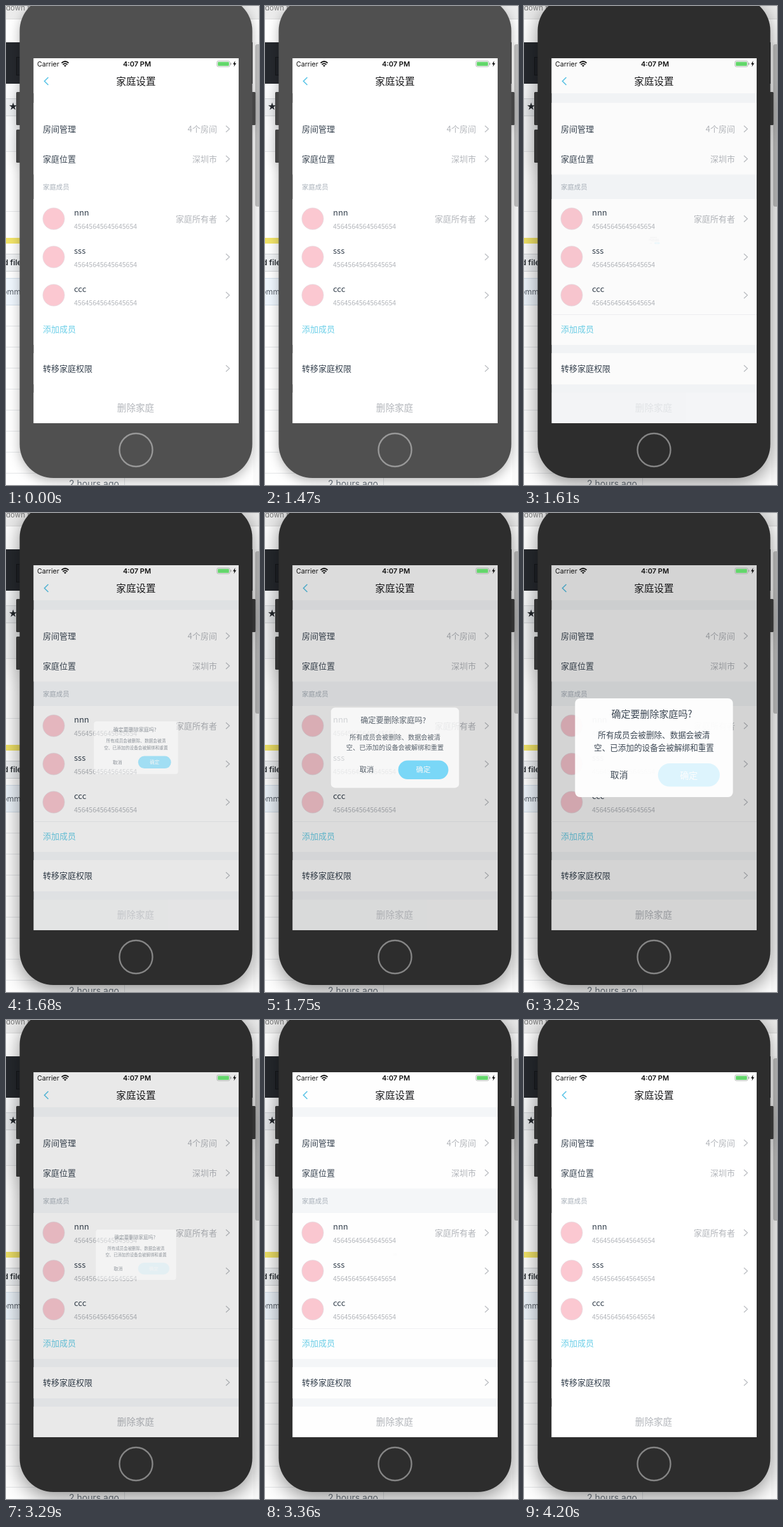
Animation, 398 px wide and 752 px high, one loop 5.46 s. Source, as an HTML page:

```html
<!DOCTYPE html>
<html lang="zh">
<head>
<meta charset="utf-8">
<style>
html, body { margin: 0; width: 100%; height: 100%; overflow: hidden; background: #fff; }
svg { display: block; width: 398px; height: 752px; }
text { font-family: "Noto Sans CJK SC", "Noto Sans CJK", sans-serif; white-space: pre; }
.latin { font-family: Inter, "Noto Sans CJK SC", sans-serif; }
</style>
</head>
<body>
<svg id="stage" viewBox="0 0 398 752"></svg>
<script>
const LOOP = 5460;
const INK = '#36424f', MUTED = '#b3b6bb', CYAN = '#6ccfe8';

const rect = (x, y, w, h, fill, extra = '') =>
  `<rect x="${x}" y="${y}" width="${w}" height="${h}" fill="${fill}" ${extra}/>`;
// y is the middle of the line of text
const text = (x, y, size, str, fill, extra = '') =>
  `<text x="${x}" y="${y + size * 0.37}" font-size="${size}" fill="${fill}" ${extra}>${str}</text>`;
const MID = 'text-anchor="middle"', END = 'text-anchor="end"', LATIN = 'class="latin"';
const chevron = y =>
  `<path d="M346 ${y - 5}l5.500 5l-5.500 5" fill="none" stroke="#b9bcc0" stroke-width="1.200"/>`;
const row = (y, label, value = '') =>
  text(58, y, 13, label, INK) + text(332, y, 13, value, MUTED, END) + chevron(y);
const member = (y, name, role = '') =>
  `<circle cx="75" cy="${y}" r="17" fill="#fbc8d1" stroke="#e6d9df" stroke-width=".8"/>` +
  text(107, y - 10, 13, name, INK) + text(107, y + 12, 10.5, '45645645645645654', MUTED) +
  text(332, y, 13, role, MUTED, END) + chevron(y);

const page =
  rect(0, 0, 398, 752, '#fff') + rect(0, 0, 398, 20, '#ececec') +
  rect(0, 20, 398, 1, '#dcdcdc') + text(0, 3, 11.5, 'down 编辑', '#777', LATIN) +
  rect(0, 57, 388, 65, '#26292e') + rect(16.5, 80.5, 20, 28, '#202328', 'stroke="#15171a"') +
  rect(0, 122, 388, 106, '#fafbfc') + rect(-5, 145.5, 40, 27, '#f0f2f4', 'stroke="#d5d8db"') +
  text(4, 157, 16, '★', '#25292e', 'style="font-family:\'DejaVu Sans\',sans-serif"') +
  [228, 322, 502, 535, 568, 601, 634, 667, 700, 733].map(y => rect(0, y, 186, 1, '#e4e6e8')).join('') +
  rect(0, 364, 40, 9, '#f1e368') +
  rect(-5, 389.5, 40, 27, '#f1f3f5', 'stroke="#d0d3d6"') +
  text(-4, 403, 12, 'd file', '#24292e', LATIN + ' font-weight="600"') +
  rect(-5, 427.5, 40, 42, '#eff6fd', 'stroke="#d3dfea"') +
  text(-6, 448, 12.5, 'omm', '#586069', LATIN) +
  text(99, 750, 14, '2 hours ago', '#6a737d', LATIN) +
  rect(186, 735, 1, 17, '#dfe2e5') +
  rect(389, 57, 9, 695, '#fafafa') + rect(392, 60, 9, 255, '#c1c1c1', 'rx="3.500"');

const phone =
  `<g id="body">` +
  rect(16, 135, 10, 52, 'inherit', 'class="key" rx="1.500"') +
  rect(16, 194, 10, 52, 'inherit', 'class="key" rx="1.500"') +
  rect(383, 135, 9.5, 52, 'inherit', 'class="key" rx="1.500"') +
  rect(21.5, -14, 366, 755, '#505050', 'id="shell" rx="53"') + `</g>` +
  `<circle id="home" cx="204.500" cy="697" r="26" fill="none" stroke-width="2.400"/>`;

const settings =
  rect(43.5, 82, 322.5, 573, '#fff', 'id="bands"') +
  [[82, 55], [152, 112.5], [303, 229], [545, 49]].map(([y, h]) => rect(43.5, y, 322.5, h, '#fff')).join('') +
  text(204.5, 118, 15.6, '家庭设置', '#1c1c1e', MID) +
  `<path d="M66.500 112l-6 6l6 6" fill="none" stroke="#5fc6e8" stroke-width="1.700"/>` +
  row(193, '房间管理', '4个房间') + row(240, '家庭位置', '深圳市') +
  text(58, 284, 10.4, '家庭成员', '#a9b1ba', 'font-weight="500"') +
  member(334, 'nnn', '家庭所有者') + member(394, 'sss') + member(454, 'ccc') +
  rect(43.5, 484, 322.5, 1, '#f0f1f3', 'id="line"') +
  text(58, 507, 13, '添加成员', CYAN) + row(569, '转移家庭权限') +
  `<g id="remove">` + rect(43.5, 607, 322.5, 48, '#fff') +
  text(204, 631, 14.6, '删除家庭', MUTED, MID) + `</g>`;

const statusBar =
  text(49, 91, 10.6, 'Carrier', '#111', LATIN) +
  text(206, 91, 11, '4:07 PM', '#111', LATIN + ' font-weight="600" ' + MID) +
  `<g fill="none" stroke="#111" stroke-width="1.700"><path d="M87.500 89.500q5.500-5 11 0M89.500 92q3.500-3.200 7 0"/></g>
   <path d="M91 93.500q2-1.500 4 0l-2 2z" fill="#111"/>` +
  rect(331.8, 86.3, 20.4, 9, 'none', 'rx="2.300" stroke="#a5a9a5" stroke-width=".8"') +
  rect(333.2, 87.7, 17.6, 6.2, '#63d76b', 'rx="1"') + rect(353, 89, 1.4, 3.6, '#a5a9a5', 'rx=".7"') +
  `<path d="M360.500 86l-3.500 5.500h2.200l-.7 4l3.700-5.700h-2.300z" fill="#111"/>`;

const dialog =
  `<g id="dialog">` + rect(75.5, 288, 258, 161, '#fff', 'rx="8"') +
  text(201, 313, 15.6, '确定要删除家庭吗?', INK, MID + ' font-weight="500"') +
  text(204.5, 348, 13.1, '所有成员会被删除、数据会被清', INK, MID) +
  text(204.5, 368, 13.1, '空、已添加的设备会被解绑和重置', INK, MID) +
  text(147.5, 413, 14.4, '取消', INK, MID) +
  `<g id="confirm">` + rect(211, 394, 101, 38, '#5fd6ff', 'rx="19"') +
  text(261.5, 413, 14.6, '确定', '#fff', MID + ' font-weight="500"') + `</g></g>`;

const $ = id => document.getElementById(id);
$('stage').innerHTML = page + phone + settings +
  rect(43.5, 82, 322.5, 573, '#000', 'id="shade"') + statusBar + dialog;

const progress = (t, start, length) => Math.min(1, Math.max(0, (t - start) / length));
const easeOut = p => 1 - (1 - p) ** 3;
const easeInOut = p => p < 0.5 ? 2 * p * p : 1 - 2 * (1 - p) ** 2;

function draw(t) {
  const focused = t >= 1540;
  $('shell').setAttribute('fill', focused ? '#2d2d2d' : '#505050');
  document.querySelectorAll('.key').forEach(k => k.setAttribute('fill', focused ? '#333' : '#454545'));
  $('home').setAttribute('stroke', focused ? '#858585' : '#989898');
  $('body').style.filter = focused
    ? 'drop-shadow(0 8px 16px rgba(0,0,0,.45))' : 'drop-shadow(0 5px 9px rgba(0,0,0,.28))';

  // section bands are only distinct around the dialog transitions
  const banded = (t >= 1540 && t < 2170) || (t >= 2940 && t < 3710);
  $('bands').setAttribute('fill', banded ? '#f5f7f9' : '#fff');
  $('line').setAttribute('opacity', banded ? 1 : 0);

  const open = easeOut(progress(t, 1600, 380)) * (1 - easeInOut(progress(t, 3195, 190)));
  $('shade').setAttribute('opacity', 0.175 * open);
  $('dialog').setAttribute('opacity', open);
  $('dialog').setAttribute('transform',
    `translate(204.5 368.5) scale(${open}) translate(-204.5 -368.5)`);

  const pressed = progress(t, 1540, 60) * (1 - progress(t, 1600, 250));
  $('remove').setAttribute('opacity', 1 - 0.8 * pressed);
  $('confirm').setAttribute('opacity', 1 - 0.8 * easeInOut(progress(t, 2570, 200)));
}

const start = performance.now();
function tick() {
  draw((performance.now() - start) % LOOP);
  requestAnimationFrame(tick);
}
tick();
</script>
</body>
</html>
```
